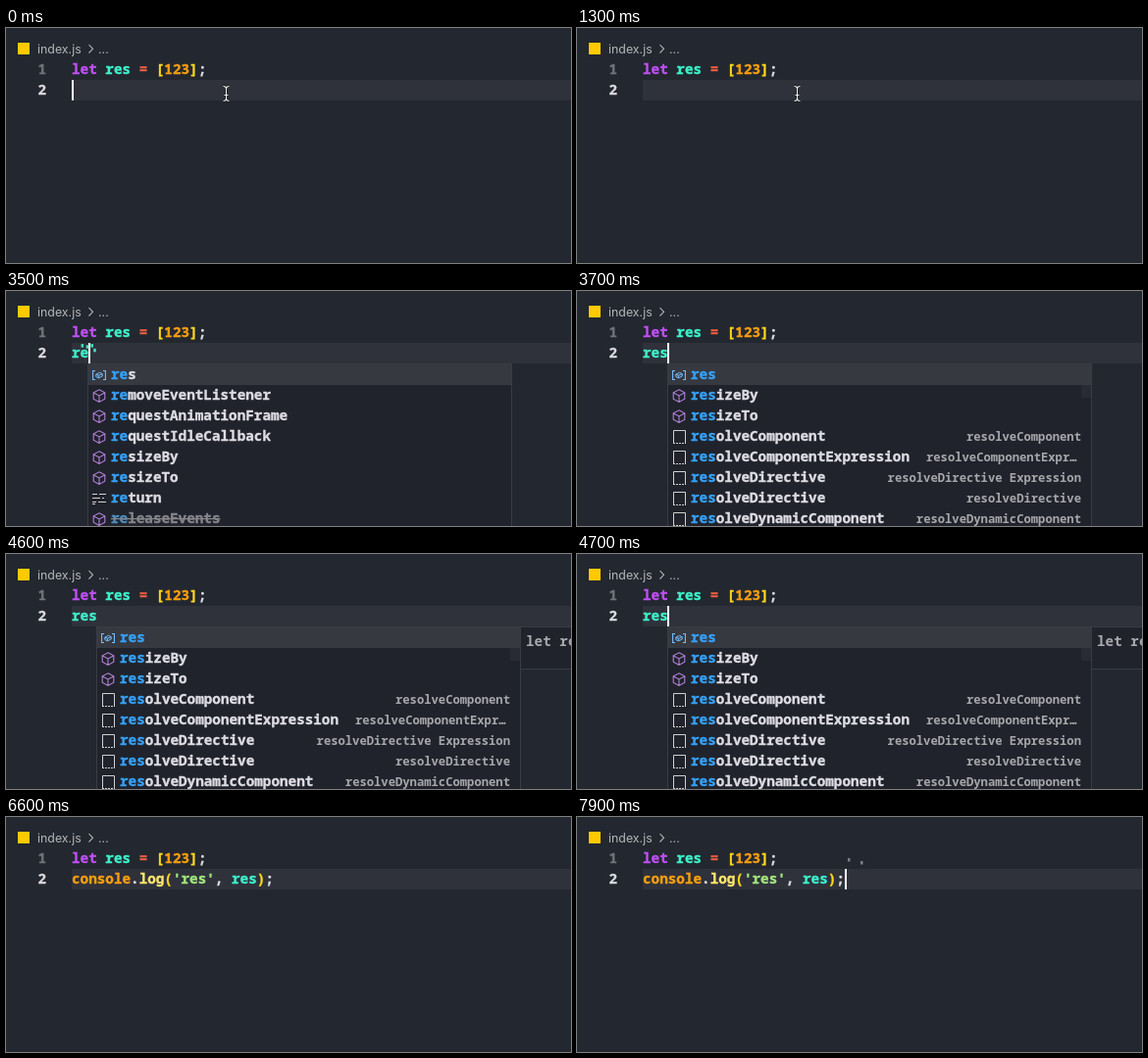
An HTML page that plays this animation: 576x240 px, repeating every 8 s.

```html
<!DOCTYPE html>
<html>
<head>
<meta charset="utf-8">
<style>
html, body { margin: 0; width: 100%; height: 100%; overflow: hidden; background: #23272f; }
svg { display: block; }
text { white-space: pre; font: bold 14.3px "Noto Sans Mono", monospace; font-variant-ligatures: none; }
.code { stroke-width: .35px; }
.crumb { font: 12.4px Inter, sans-serif; fill: #b4b5b9; }
.detail { font-size: 12.2px; fill: #a6a7ab; }
.doc { fill: #a9a9ae; }
</style>
</head>
<body>
<svg id="stage" width="576" height="240" viewBox="0 0 576 240"></svg>
<script>
const LOOP = 8000, CH = 8.58, LEFT = 67, ROW = 21;
const C = {
  fg: '#dedce4', purple: '#c050f5', teal: '#3df2cb', red: '#ee5d43', orange: '#f89f10',
  gold: '#ffd91a', yellow: '#ffe66d', green: '#a0e67c', blue: '#35a2fa', cube: '#b180d7',
  dim: '#85858b', grey: '#a2a3a9', panel: '#20232b', edge: '#3a3c45'
};
const stage = document.getElementById('stage');

function add(parent, tag, attrs = {}, text) {
  const el = document.createElementNS('http://www.w3.org/2000/svg', tag);
  for (const k in attrs) el.setAttribute(k, attrs[k]);
  if (text !== undefined) el.textContent = text;
  parent.appendChild(el);
  return el;
}
const rect = (p, x, y, width, height, fill) => add(p, 'rect', { x, y, width, height, fill });
const path = (p, d, stroke, w = 1) => add(p, 'path', { d, stroke, 'stroke-width': w, fill: 'none' });
function code(parent, x, y, parts) {
  const t = add(parent, 'text', { x, y, class: 'code' });
  for (const [s, fill] of parts) add(t, 'tspan', { fill, stroke: fill }, s);
  return t;
}
const show = (el, on) => { el.style.display = on ? '' : 'none'; };

// Editor
rect(stage, LEFT, 53, 509, ROW, '#2f313b');
rect(stage, 12, 15, 12, 12, '#ffca00');
add(stage, 'text', { x: 32, y: 26, class: 'crumb' }, 'index.js');
path(stage, 'M84.5 17 L88.5 21.3 L84.5 25.5', '#b4b5b9', 1.1);
add(stage, 'text', { x: 94, y: 26, class: 'crumb' }, '...');
code(stage, 32.5, 47, [['1', '#70737a']]);
code(stage, 32.5, 68, [['2', '#dcd9e0']]);
code(stage, LEFT, 47, [['let ', C.purple], ['res ', C.teal], ['= ', C.red],
  ['[', C.gold], ['123', C.orange], [']', C.gold], [';', C.fg]]);

// Second line as it is typed
const typed = [
  [0, []],
  [3300, [['r', C.teal]]],
  [3400, [['re', C.teal]]],
  [3700, [['res', C.teal]]],
  [4900, [['console', C.orange], ['.', C.fg], ['log', C.yellow], ['(', C.gold],
    ["'res'", C.green], [', ', C.fg], ['res', C.teal], [')', C.gold], [';', C.fg]]]
].map(([at, parts]) => ({
  at, len: parts.reduce((n, p) => n + p[0].length, 0), el: code(stage, LEFT, 68, parts)
}));

// Suggestion icons, drawn in a 14 px box
const icons = {
  cube(g) {
    path(g, 'M7 .8 L12.8 3.8 V10.2 L7 13.4 L1.2 10.2 V3.8 Z M1.4 4 L7 6.9 L12.6 4 M7 6.9 V13.2', C.cube, 1.1);
  },
  variable(g) {
    path(g, 'M3 2.5 H.6 V11.5 H3 M11 2.5 H13.4 V11.5 H11', '#75beff', 1.1);
    path(g, 'M3.8 6.2 L7.6 4.3 L10.2 5.6 V8 L6.4 9.8 L3.8 8.5 Z M3.8 6.2 L6.4 7.3 L10.2 5.6 M6.4 7.3 V9.8', '#75beff');
  },
  word(g) {
    path(g, 'M0 2.5 H5 M7 2.5 H14 M0 6.5 H8 M10 6.5 H12 M0 10.5 H4 M6 10.5 H14 M0 12.5 H3', '#d0d0d2', 1.2);
  },
  snippet(g) {
    path(g, 'M1.5 13 V.5 H13.5 V13', '#d0d0d2');
    path(g, 'M1 13.5 H14', '#d0d0d2').setAttribute('stroke-dasharray', '2 1');
  }
};

function popup(len, rows, from, to) {
  const g = add(stage, 'g');
  const x = Math.round(LEFT + CH * len) - 1;
  add(g, 'rect', { x: x + .5, y: 74.5, width: 432, height: 180, fill: C.panel, stroke: C.edge });
  rect(g, x + 1, 75, 431, ROW, '#373941');
  rows.forEach(([icon, label, detail, old], i) => {
    const y = 90 + i * ROW;
    icons[icon](add(g, 'g', { transform: `translate(${x + 5} ${y - 11})` }));
    code(g, x + 24, y, [[label.slice(0, len), old ? '#4d8fc0' : C.blue],
      [label.slice(len), old ? C.dim : C.fg]]);
    if (old) rect(g, x + 24, y - 5, CH * label.length, 1.3, C.dim);
    if (detail) {
      const cut = detail.endsWith('…');
      add(g, 'text', { x: cut ? 356 : 514, y, class: 'detail', 'text-anchor': cut ? 'start' : 'end' }, detail);
    }
  });
  return { g, from, to };
}

const shortList = [
  ['variable', 'res'], ['cube', 'removeEventListener'], ['cube', 'requestAnimationFrame'],
  ['cube', 'requestIdleCallback'], ['cube', 'resizeBy'], ['cube', 'resizeTo'],
  ['word', 'return'], ['cube', 'releaseEvents', '', true]
];
const longList = [
  ['variable', 'res'], ['cube', 'resizeBy'], ['cube', 'resizeTo'],
  ['snippet', 'resolveComponent', 'resolveComponent'],
  ['snippet', 'resolveComponentExpression', 'resolveComponentExpr…'],
  ['snippet', 'resolveDirective', 'resolveDirective Expression'],
  ['snippet', 'resolveDirective', 'resolveDirective'],
  ['snippet', 'resolveDynamicComponent', 'resolveDynamicComponent']
];
const popups = [popup(2, shortList, 3400, 3700), popup(3, longList, 3700, 4900)];
rect(popups[1].g, 514, 96, 10, 13, '#282b33');

// Documentation panel beside the list
const doc = add(stage, 'g');
add(doc, 'rect', { x: 524.5, y: 74.5, width: 60, height: 43, fill: C.panel, stroke: C.edge });
add(doc, 'text', { x: 530, y: 94, class: 'doc' }, 'let res');

const caret = rect(stage, LEFT, 53, 2, ROW, '#fff');

// Mouse pointer
const mouse = add(stage, 'g');
const beam = 'M221.5 59.5 Q224.5 59.5 224.5 62 V72 Q224.5 74.5 221.5 74.5 M227.5 59.5 Q224.5 59.5 224.5 62 M224.5 72 Q224.5 74.5 227.5 74.5 M222.5 68.5 H226.5';
path(mouse, beam, '#15171c', 2.6);
path(mouse, beam, '#f2f2f2', 1.1);

// Sparks: end offset from the key position, life in ms
const sparks = [[4, -20, 520], [17, -17, 520], [36, -8, 380], [29, -20, 330]]
  .map(([dx, dy, life]) => ({ dx, dy, life, el: rect(stage, 0, 0, 2.5, 3.5, C.fg) }));
const bursts = [
  [3300, 67, C.teal], [3400, 76, C.teal], [3700, 84, C.teal], [4900, 273, C.grey],
  [5750, 273, C.grey], [6600, 273, C.grey], [7450, 273, C.grey]
];
const latest = (list, test) => list.filter(test).pop();

function drawSparks(t) {
  const b = latest(bursts, e => e[0] <= t);
  for (const s of sparks) {
    const age = b ? t - b[0] : Infinity;
    show(s.el, age > 0 && age < s.life);
    if (!b) continue;
    const k = Math.min(1, age / 450);
    const out = 1 - (1 - k) ** 2;
    s.el.setAttribute('x', b[1] + s.dx * out - 1);
    s.el.setAttribute('y', 62 + s.dy * out);
    s.el.setAttribute('fill', b[2]);
    s.el.setAttribute('opacity', 1 - .3 * k);
  }
}

// Caret toggles every 500 ms, restarted by each key
function caretOn(t) {
  if (t < 3300) return Math.floor((t + 200) / 500) % 2 === 0;
  const key = latest(typed, e => e.at <= t).at;
  return Math.floor((t - key) / 500) % 2 === 0;
}

function draw(t) {
  const line = latest(typed, e => e.at <= t);
  for (const e of typed) show(e.el, e === line);
  for (const p of popups) show(p.g, t >= p.from && t < p.to);
  show(doc, t >= 4000 && t < 4900);
  show(mouse, t < 3300);
  show(caret, caretOn(t));
  caret.setAttribute('x', Math.round(LEFT + CH * line.len - .4));
  drawSparks(t);
}

const start = performance.now();
function tick() {
  const t = Math.max(0, performance.now() - start) % LOOP;
  draw(Math.floor(t / 100) * 100);
  requestAnimationFrame(tick);
}
tick();
</script>
</body>
</html>
```
